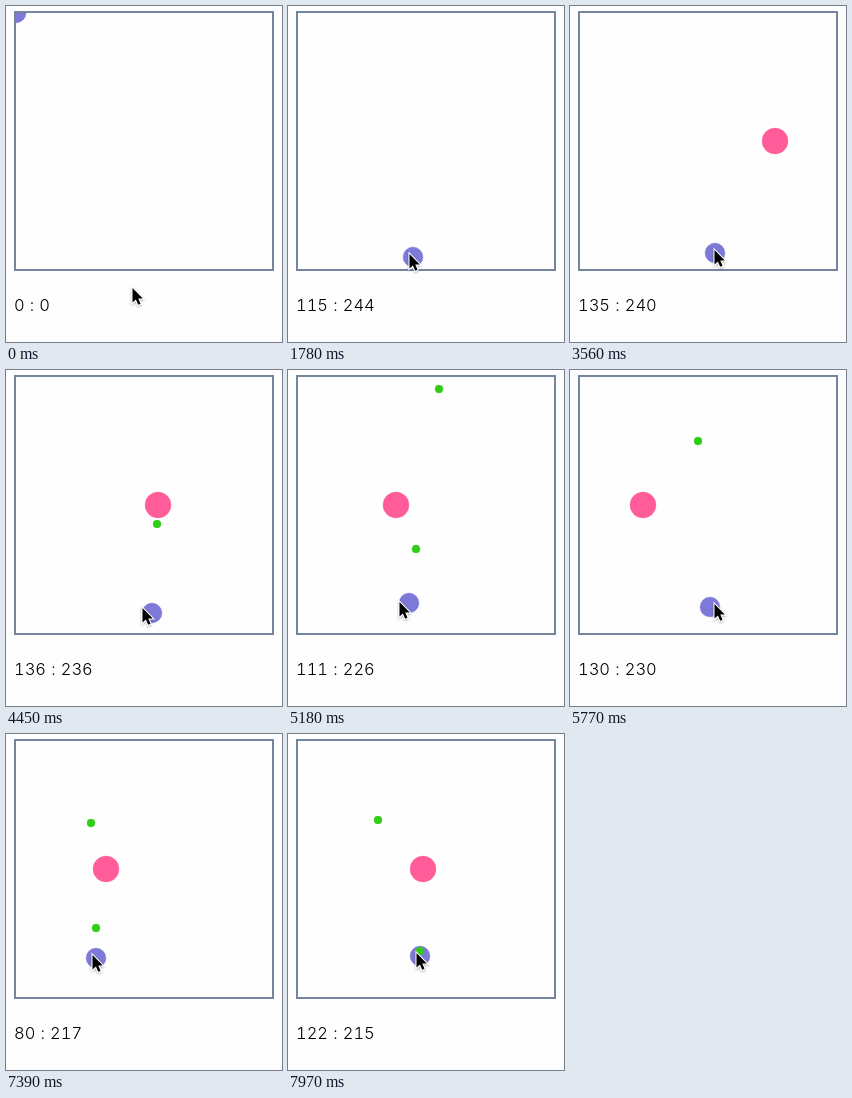
An HTML page for the animation above (8 s loop, 276 by 336 pixels).

```html
<!DOCTYPE html>
<html lang="en">
<head>
<meta charset="utf-8">
<title>Shooter</title>
<style>
html, body { margin: 0; width: 100%; height: 100%; overflow: hidden; background: #fefefe; }
svg { display: block; }
text {
  font: 300 16.5px Inter, "DejaVu Sans", sans-serif;
  font-variant-numeric: tabular-nums;
  font-variant-ligatures: no-contextual;
  word-spacing: .7px;
  fill: #000;
}
</style>
</head>
<body>
<svg width="276" height="336" viewBox="0 0 276 336">
  <defs>
    <clipPath id="field"><rect width="256" height="256"/></clipPath>
    <filter id="shadow" x="-50%" y="-50%" width="200%" height="200%">
      <feDropShadow dx="0" dy="1" stdDeviation="0.8" flood-opacity="0.35"/>
    </filter>
  </defs>
  <rect x="9" y="6" width="258" height="258" fill="#fefefe" stroke="#74869d" stroke-width="2"/>
  <g transform="translate(10 7)" clip-path="url(#field)" stroke-opacity=".3">
    <circle id="enemy" cy="128" r="13" fill="#ff5c99" stroke="#ff5c99"/>
    <circle id="player" r="10" fill="#7d79d8" stroke="#7d79d8"/>
    <g id="bullets" fill="#30cc18" stroke="#30cc18"></g>
  </g>
  <text id="label" x="8" y="305"></text>
  <path id="cursor" d="M0 0V14.5L3.4 11.4L5.7 16.8L8 15.8L5.8 10.5H10.3Z" stroke="#fff" stroke-width="2" paint-order="stroke" filter="url(#shadow)"/>
</svg>
<script>
const LOOP = 8000, START = 436, STEP = 147.6;
const ENEMY_SPEED = 8.8, ENEMY_TURN = 40, BULLET_SPEED = 27;

// Turning points of the mouse: [step, x, y], eased in between.
const turns = [
  [0, 120, 278], [3, 115, 244], [13, 115, 244], [25, 142, 239], [32, 111, 226], [34, 99, 229],
  [36.8, 138, 230], [42, 72, 236], [46, 80, 217], [48, 80, 217], [50.7, 122, 215]
];
const shotSteps = [23.6, 29.9, 41.3, 45.9, 50.8];

const el = id => document.getElementById(id);
const set = (node, attrs) => {
  for (const key in attrs) node.setAttribute(key, attrs[key]);
};
const ease = k => k * k * (3 - 2 * k);

function pathAt(step) {
  const next = turns.findIndex(turn => turn[0] > step);
  if (next < 0) return turns.at(-1).slice(1);
  const [s0, x0, y0] = turns[next - 1], [s1, x1, y1] = turns[next];
  const k = ease((step - s0) / (s1 - s0));
  return [Math.round(x0 + (x1 - x0) * k), Math.round(y0 + (y1 - y0) * k)];
}

// Each bullet starts where the player is when it fires.
const bullets = shotSteps.map(born => {
  const [x, y] = pathAt(born);
  const dot = document.createElementNS("http://www.w3.org/2000/svg", "circle");
  set(dot, { r: 4, cx: x });
  return { born, y, dot: el("bullets").appendChild(dot) };
});

function draw() {
  const t = performance.now() % LOOP;
  const step = t < START ? -1 : Math.floor((t - START) / STEP);

  // The player stays in the corner until the mouse enters the field.
  const [x, y] = step < 2 ? [0, 0] : pathAt(step);
  set(el("player"), { cx: x, cy: y });
  el("label").textContent = `${x} : ${y}`;

  // The mouse runs one step ahead of the player.
  const [mouseX, mouseY] = pathAt(step + 1);
  set(el("cursor"), { transform: `translate(${mouseX + 6.5} ${mouseY + 4})` });

  set(el("enemy"), { cx: Math.round(28 + ENEMY_SPEED * Math.abs(step - ENEMY_TURN)) });

  for (const { born, y, dot } of bullets) {
    set(dot, {
      cy: Math.round(y - BULLET_SPEED * (step - born)),
      visibility: step < born ? "hidden" : "visible"
    });
  }

  requestAnimationFrame(draw);
}
draw();
</script>
</body>
</html>
```
